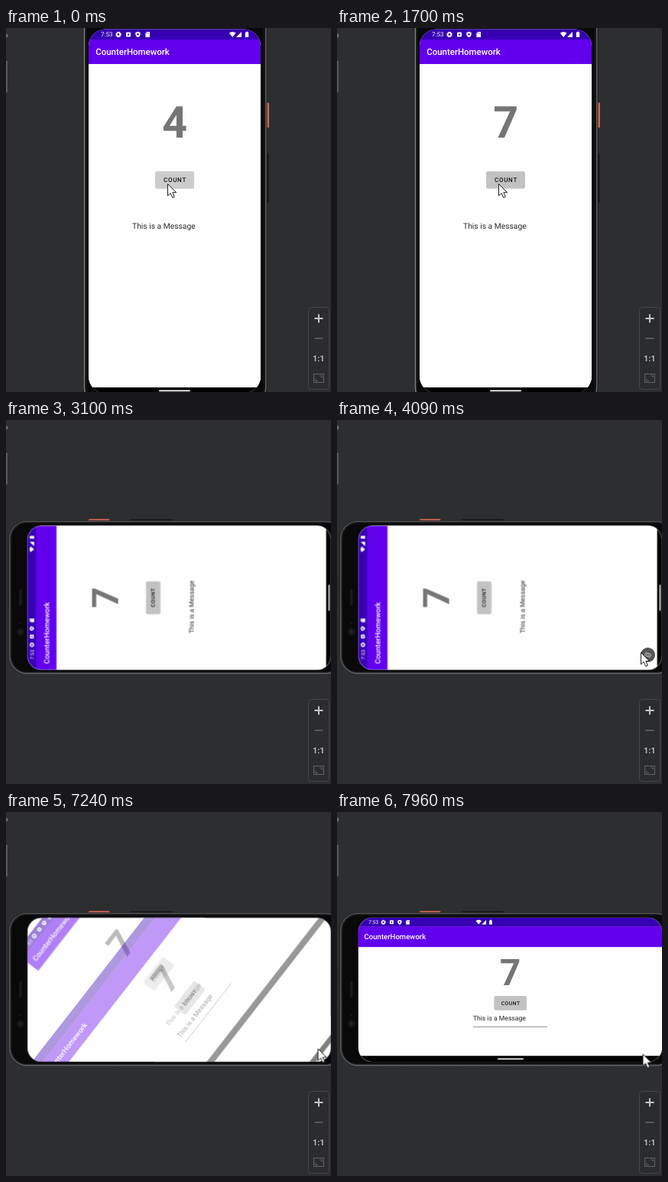
An HTML page that plays this animation: 425x475 px, repeating every 8 s.

```html
<!DOCTYPE html>
<html lang="en">
<head>
<meta charset="utf-8">
<title>Counter app in an emulator</title>
<style>
html, body { margin: 0; width: 100%; height: 100%; overflow: hidden; background: #2d2e30; }
svg { display: block; width: 100vw; height: 100vh; }
text { font-family: Roboto, "Open Sans", sans-serif; text-rendering: geometricPrecision; }
.mid { text-anchor: middle; }
.medium { font-weight: 500; }
.num { font-weight: 700; fill: #757575; text-anchor: middle; }

/* Everything runs on one 8 s clock with hard changes. */
.t { animation: 8s step-end infinite; }

.phone { animation-name: turn; }
@keyframes turn {
  0% { transform: none; }
  38.75%, 100% { transform: matrix(0, -.83556, .83556, 0, 26.747, 416.24); }
}

.n4 { animation-name: n4; }
.n5 { animation-name: n5; }
.n6 { animation-name: n6; }
.n7 { animation-name: n7; }
@keyframes n4 { 0% { visibility: visible; } 9.25%, 100% { visibility: hidden; } }
@keyframes n5 { 0% { visibility: hidden; } 9.25% { visibility: visible; } 10.75%, 100% { visibility: hidden; } }
@keyframes n6 { 0% { visibility: hidden; } 10.75% { visibility: visible; } 18.25%, 100% { visibility: hidden; } }
@keyframes n7 { 0% { visibility: hidden; } 18.25%, 100% { visibility: visible; } }

.press { animation-name: press; }
@keyframes press {
  0% { fill: #cccccc; }
  6.25% { fill: #c6c6c6; }
  9.25% { fill: #c9c9c9; }
  10.75% { fill: #c5c5c5; }
  16.75% { fill: #cbcbcb; }
  18.25% { fill: #c8c8c8; }
  19.75% { fill: #c5c5c5; }
  21.25%, 100% { fill: #c2c2c2; }
}

.tip { animation-name: tip; }
@keyframes tip { 0% { visibility: hidden; } 37.25% { visibility: visible; } 38.75%, 100% { visibility: hidden; } }

/* Screen rotation: the old layout turns out while the new one turns in. */
.old { transform-origin: 220.5px 239px; animation-name: leave; }
@keyframes leave {
  0% { transform: none; opacity: 1; }
  90.5% { transform: rotate(38deg); opacity: .5; }
  92%, 100% { transform: rotate(83deg); opacity: 0; }
}
.new { transform-origin: 226.5px 232px; animation-name: enter; }
@keyframes enter {
  0% { transform: rotate(-90deg); opacity: 0; }
  90.5% { transform: rotate(-52deg); opacity: .4; }
  92% { transform: rotate(-7deg); opacity: .8; }
  93.5% { transform: rotate(-.4deg); opacity: 1; }
  95%, 100% { transform: none; opacity: 1; }
}
.bars { animation-name: bars; }
@keyframes bars { 0% { opacity: 0; } 95% { opacity: .5; } 96.5%, 100% { opacity: 1; } }

.spin { animation-name: spin; }
@keyframes spin { 0% { visibility: hidden; } 49.625% { visibility: visible; } 90.5%, 100% { visibility: hidden; } }
.disc { animation-name: disc; }
@keyframes disc { 0% { fill: #555; } 63.375%, 100% { fill: #404040; } }
.glyph { transform-origin: 406.5px 306.5px; animation-name: glyph; }
@keyframes glyph {
  0% { transform: rotate(0); }
  52.625% { transform: rotate(15deg); }
  54.125% { transform: rotate(45deg); }
  55.625% { transform: rotate(75deg); }
  57.125% { transform: rotate(87deg); }
  58.625%, 100% { transform: rotate(90deg); }
}

.cursor { animation-name: point; }
@keyframes point {
  0% { transform: translate(211px, 203px); visibility: visible; }
  22.75% { transform: translate(167px, 40px); visibility: hidden; }
  41.875% { transform: translate(167px, 40px); visibility: visible; }
  43.375% { transform: translate(277px, 182px); }
  48.125% { transform: translate(325px, 236px); }
  49.625% { transform: translate(371px, 281px); }
  51.125% { transform: translate(397px, 303px); }
  52.625% { transform: translate(407.5px, 308.5px); }
  98% { transform: translate(405px, 311px); }
  99.5%, 100% { transform: translate(399.5px, 315.5px); visibility: visible; }
}
</style>
</head>
<body>
<svg viewBox="0 0 425 475" preserveAspectRatio="none">
  <defs>
    <linearGradient id="rim" x1="0" x2="1" y1="0" y2="0">
      <stop offset="0" stop-color="#858687"/>
      <stop offset=".04" stop-color="#77787a"/>
      <stop offset="1" stop-color="#66676a"/>
    </linearGradient>
    <clipPath id="tall"><rect x="108" y="1.5" width="225" height="475.1" rx="22"/></clipPath>
    <clipPath id="wide"><rect x="28" y="138" width="397" height="188" rx="18.4"/></clipPath>

    <g id="status" fill="#fff">
      <text x="124" y="11.4" font-size="8">7:53</text>
      <circle cx="147" cy="8.5" r="2.3" fill="none" stroke="#fff" stroke-width="1.7"/>
      <circle cx="147" cy="8.5" r="3.4" fill="none" stroke="#fff" stroke-width="1" stroke-dasharray="1.4 1.27"/>
      <rect x="157" y="5.5" width="6" height="6" rx="1"/>
      <path d="M160 7v3M158.8 8.6h2.4" stroke="#3700b3" stroke-width=".9"/>
      <path d="M172.5 4.8l3.2 1.2v2.6q-.4 2.5-3.2 3.6q-2.8-1.1-3.2-3.6v-2.6z"/>
      <circle cx="172.5" cy="8.3" r="1.2" fill="#3700b3"/>
      <path d="M184.2 5h3.8v7h-5.6v-5.1z"/>
      <path d="M184.6 6v1.5M186.4 6v1.5" stroke="#3700b3" stroke-width=".6"/>
      <path d="M296.2 12l-4.4-5.4q4.4-3.4 8.8 0z"/>
      <path d="M308 5v7h-7z"/>
      <path d="M314 4.8h2v.8h1.2v6.4h-4.4v-6.4h1.2z"/>
    </g>
  </defs>

  <rect width="425" height="475" fill="#2d2e30"/>
  <rect y="43" width="2" height="41" fill="#57595b"/>
  <circle cx="0" cy="10" r="1.8" fill="none" stroke="#a5a7a9"/>

  <g class="phone t">
    <rect x="340" y="97.5" width="3.8" height="32.5" rx="1" fill="#e2705a"/>
    <rect x="340" y="163" width="3.6" height="65" rx="1" fill="#18191a"/>
    <rect x="100.8" y="-27.5" width="240.8" height="524" rx="28" fill="#161718"/>
    <rect x="102.4" y="-26.2" width="237.4" height="521.4" rx="27" fill="#09090a" stroke="url(#rim)" stroke-width="1.5"/>
    <rect x="104.5" y="-24" width="233" height="517" rx="25" fill="none" stroke="#1f2022"/>
    <path d="M209 -9.3h24" stroke="#2b2c2e" stroke-width="4" stroke-dasharray="1 .8"/>
    <circle cx="167.5" cy="-9.3" r="5" fill="#141517" stroke="#232426"/>
    <circle cx="167.5" cy="-9.3" r="1.8" fill="#292b30"/>
    <circle cx="181" cy="-9.3" r="1.5" fill="#1d1e20"/>

    <g clip-path="url(#tall)">
      <rect x="108" y="1" width="225" height="476" fill="#fefefe"/>
      <g class="old t">
        <rect x="108" y="1" width="225" height="476" fill="#fefefe"/>
        <rect x="108" y="1" width="225" height="14.5" fill="#3700b3"/>
        <rect x="108" y="15" width="225" height="32" fill="#6200ee"/>
        <use href="#status"/>
        <text class="medium" x="117.2" y="35.2" font-size="11.46" fill="#fff">CounterHomework</text>
        <g class="num" font-size="57.3">
          <text class="n4 t" x="220.7" y="143">4</text>
          <text class="n5 t" x="220.7" y="143">5</text>
          <text class="n6 t" x="220.7" y="143">6</text>
          <text class="n7 t" x="220.7" y="143">7</text>
        </g>
        <rect x="195" y="188" width="51" height="22" rx="2.5" fill="#000" opacity=".16"/>
        <rect class="press t" x="195" y="187" width="51" height="22" rx="2.3"/>
        <text class="medium mid" x="221" y="201" font-size="8.02" letter-spacing=".72" fill="#111">COUNT</text>
        <text x="165" y="262" font-size="10.31" fill="#2c2c2c">This is a Message</text>
        <rect x="108" y="469" width="225" height="8" fill="#000"/>
        <rect x="200" y="472.5" width="41" height="1.7" rx=".8" fill="#fff"/>
      </g>
    </g>
  </g>

  <g clip-path="url(#wide)">
    <g class="new t">
      <rect x="28" y="138" width="397" height="188" fill="#fefefe"/>
      <rect x="28" y="138" width="397" height="11.8" fill="#3700b3"/>
      <rect x="28" y="149.5" width="397" height="26.7" fill="#6200ee"/>
      <text class="medium" x="35.6" y="166.4" font-size="9.57" fill="#fff">CounterHomework</text>
      <text class="num" x="226.5" y="226" font-size="47.9">7</text>
      <rect x="205.5" y="241" width="42.5" height="18" rx="2" fill="#000" opacity=".16"/>
      <rect x="205.5" y="240" width="42.5" height="18.3" rx="2" fill="#c3c3c3"/>
      <text class="medium mid" x="227.2" y="251.8" font-size="6.7" letter-spacing=".6" fill="#111">COUNT</text>
      <text x="177.8" y="272.1" font-size="8.62" fill="#222">This is a Message</text>
      <path d="M178 280.4h97" stroke="#7b7b7b" stroke-width=".8"/>
      <rect x="28" y="318.2" width="397" height="8" fill="#000"/>
      <g class="bars t">
        <use href="#status" transform="translate(28 138) scale(.83556) translate(-108 -1.5)"/>
        <rect x="210" y="321.5" width="34" height="1.4" rx=".7" fill="#fff"/>
      </g>
    </g>
  </g>

  <g class="spin t">
    <circle class="disc t" cx="406.5" cy="306.5" r="9.5"/>
    <g class="glyph t" fill="none" stroke="#d8d8d8" stroke-width=".8">
      <rect x="405" y="304.5" width="3" height="4"/>
      <path d="M403.2 308.6a4 4 0 0 1 2-5.8M409.8 304.4a4 4 0 0 1-2 5.8"/>
    </g>
  </g>

  <path class="tip t" d="M95 .4h81" stroke="#6d6f71"/>

  <g fill="none" stroke="#606264">
    <rect x="395.5" y="364.5" width="27" height="107" rx="4" fill="#2b2c2e" stroke="#454749"/>
    <path d="M403.5 379h11M409 373.5v11" stroke="#c4c6c8" stroke-width="2"/>
    <path d="M403.5 405h11" stroke-width="1.6"/>
    <rect x="402.5" y="451.5" width="13" height="11"/>
    <path d="M404.8 457.5v3h3M410.2 453.8h3v3"/>
  </g>
  <text class="mid" x="408.8" y="434.8" font-size="11" font-weight="700" fill="#b4b6b8">1:1</text>

  <path class="cursor t" d="M.5 .5v15.4l3.6-3.3 2.6 5.9 2.7-1.2-2.6-5.6h4.9z" fill="#fff" stroke="#1c1c1c" stroke-width="1"/>
</svg>
</body>
</html>
```
